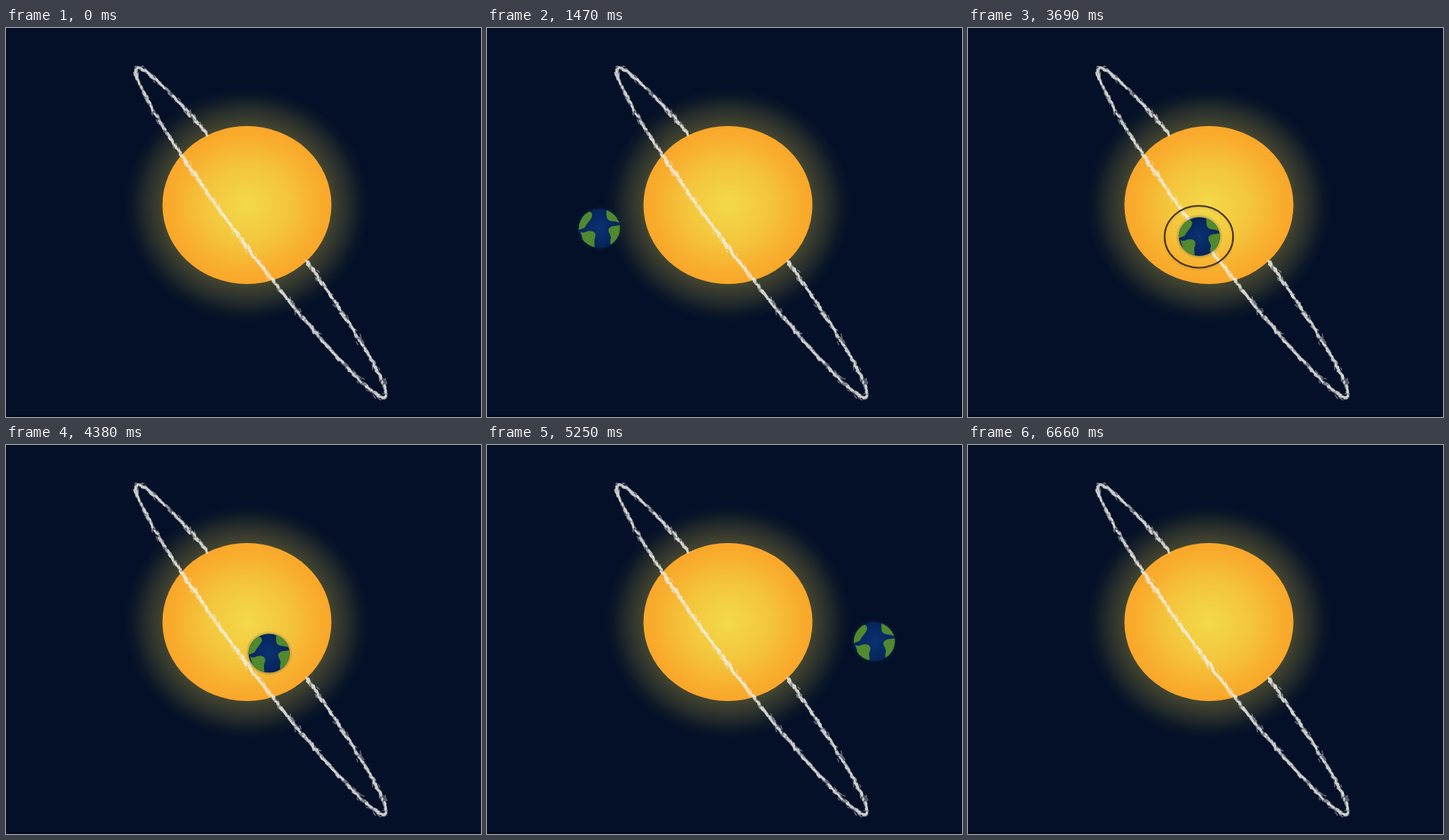
These frames come from a looping animation (624x512 px, 6.93 s). An HTML page:

```html
<!DOCTYPE html>
<html lang="en">
<head>
<meta charset="utf-8">
<title>Orbit</title>
<style>
  html, body { margin: 0; width: 100%; height: 100%; overflow: hidden; background: #031027; }
  svg { display: block; width: 100vw; height: 100vh; }
</style>
</head>
<body>
<svg viewBox="0 0 624 512">
  <defs>
    <radialGradient id="glow">
      <stop offset=".69" stop-color="#f5d748" stop-opacity=".26"/>
      <stop offset=".84" stop-color="#f5d748" stop-opacity=".13"/>
      <stop offset=".93" stop-color="#f5d748" stop-opacity=".04"/>
      <stop offset="1" stop-color="#f5d748" stop-opacity="0"/>
    </radialGradient>
    <radialGradient id="fire">
      <stop offset="0" stop-color="#f3d949"/>
      <stop offset=".5" stop-color="#f4c53c"/>
      <stop offset=".85" stop-color="#f8ad2d"/>
      <stop offset="1" stop-color="#faa72a"/>
    </radialGradient>
    <radialGradient id="sea">
      <stop offset="0" stop-color="#0b3272"/>
      <stop offset="1" stop-color="#06245a"/>
    </radialGradient>
    <radialGradient id="haze">
      <stop offset=".84" stop-color="#123a5c" stop-opacity=".3"/>
      <stop offset="1" stop-color="#123a5c" stop-opacity="0"/>
    </radialGradient>
    <clipPath id="disc"><ellipse rx="27" ry="25.5"/></clipPath>
    <filter id="soft" x="-20%" y="-20%" width="140%" height="140%"><feGaussianBlur stdDeviation="1"/></filter>
    <g id="earth">
      <ellipse rx="31" ry="29.5" fill="url(#haze)"/>
      <ellipse rx="27" ry="25.5" fill="url(#sea)"/>
      <g clip-path="url(#disc)" fill="#50892f">
        <path d="M-19-22C-11-24-7-19-11-13C-14-8-16-7-18-3C-20 1-24 0-28 3V-16Z"/>
        <path d="M-25 4C-20 8-17 3-12 3.5C-5 4-4 8-6 13C-8 18-5 22-7 27L-20 24L-23 10Z"/>
        <path d="M9-25C10-19 8-14 12-11C17-8 20-11 28-6V-20L16-28Z"/>
        <path d="M28-5C22-2 16-5 12 1C11 6 16 8 15 14C14 17 14 20 16 24L28 14Z"/>
      </g>
    </g>
  </defs>
  <rect width="624" height="512" fill="#031027"/>
  <rect y="510" width="624" height="2" fill="#020a1c"/>
  <ellipse cx="316.5" cy="233" rx="161" ry="154" fill="url(#glow)"/>
  <use id="back" href="#earth"/>
  <ellipse cx="316.5" cy="233" rx="111" ry="104" fill="url(#fire)"/>
  <g id="chalk" transform="translate(335 269.5) rotate(53)" fill="none" stroke="#f2f0ea" stroke-linecap="round"></g>
  <use id="front" href="#earth"/>
  <g id="ring" fill="none">
    <ellipse cx="303.3" cy="276.5" rx="45" ry="41" stroke="#000" stroke-opacity=".12" stroke-width="2" filter="url(#soft)"/>
    <ellipse cx="303.3" cy="274.7" rx="45" ry="40.7" stroke="#402f12" stroke-width="2"/>
  </g>
</svg>
<script>
const LOOP = 6930, STEP = 30;
const { sin, cos, asin, hypot, min, max, PI } = Math;
const $ = id => document.getElementById(id);
const clamp = v => min(1, max(0, v));

// Chalk ellipse, open where it passes behind the sun
let seed = 11;
const rand = () => (seed = (seed * 16807) % 2147483647) / 2147483647;
const spread = r => (rand() + rand() - 1) * r;

function drawChalk() {
  const a = 271, b = 26;
  const brush = (width, alpha) => ({ width, alpha, d: "" });
  const base = brush(2.8, .3), fringe = brush(1.4, .42), grain = brush(2.7, .72);

  for (let q = -1.32; q < 4.14; ) {
    const speed = hypot(a * sin(q), b * cos(q));
    const ux = -a * sin(q) / speed, uy = b * cos(q) / speed;
    const swell = 1 + .4 * sin(q * 21) * sin(q * 8 + 1);
    const mark = (path, offset, half, tilt) => {
      const o = spread(offset), k = spread(tilt);
      const x = a * cos(q) - uy * o, y = b * sin(q) + ux * o;
      const dx = (ux - uy * k) * half, dy = (uy + ux * k) * half;
      path.d += `M${x - dx} ${y - dy}l${2 * dx} ${2 * dy}`;
    };
    mark(base, 1.5 * swell, 2, .4);
    mark(fringe, 4.2 * swell, 1 + 2 * rand(), .6);
    if (rand() < .6) mark(grain, 2 * swell, .5 + 1.6 * rand(), .6);
    q += 2 / speed;
  }
  $("chalk").innerHTML = [base, fringe, grain].map(p =>
    `<path d="${p.d}" stroke-width="${p.width}" opacity="${p.alpha}"/>`).join("");
}

// Earth swings at a steady phase rate and pauses just before the lowest point.
// "sharp" bends the sine towards a triangle wave, for a more even speed.
const RATE = .0622 * PI / 180, REST = -3 * PI / 180;

function earthAt(t) {
  const arriving = t < 3000;
  const phase = arriving ? min(REST, (t - 2394) * RATE) : max(REST, (t - 4208) * RATE);
  const sharp = arriving ? .999 : .99;
  const swing = asin(sharp * sin(phase)) / asin(sharp);
  const near = cos(phase) > 0;
  const lift = (1 - swing * swing) ** .75;
  return { x: 313 + 252 * swing, y: 243 + lift * (near ? 31.5 : -39), near };
}

function render(now) {
  const t = Math.floor((now % LOOP) / STEP) * STEP;
  const { x, y, near } = earthAt(t);
  const shown = t >= 60 && t < 6660;
  for (const id of ["back", "front"]) {
    const on = shown && near === (id === "front");
    $(id).setAttribute("visibility", on ? "visible" : "hidden");
    $(id).setAttribute("transform", `translate(${x} ${y})`);
  }
  $("ring").setAttribute("opacity", clamp((t - 2330) / 460) * clamp((4160 - t) / 470));
}

drawChalk();
const start = performance.now();
function tick() {
  render(performance.now() - start);
  requestAnimationFrame(tick);
}
tick();
</script>
</body>
</html>
```
